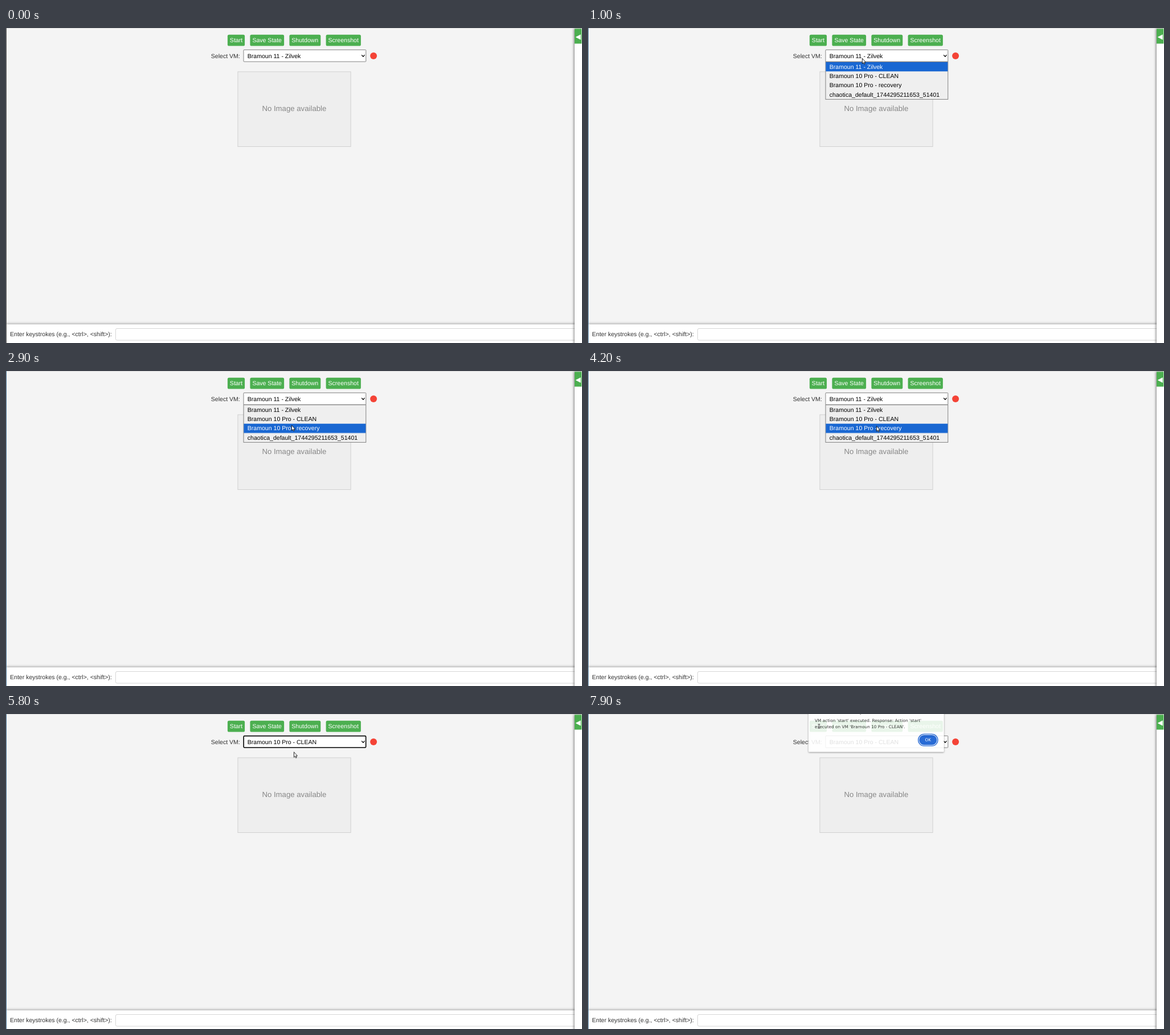
Write an HTML page that moves like this. It is 1011 by 554 pixels and loops after 8 s.

```html
<!DOCTYPE html>
<html lang="en">
<head>
<meta charset="utf-8">
<title>VM control</title>
<style>
html, body { margin: 0; width: 100%; height: 100%; overflow: hidden; background: #f4f4f4; }
svg { display: block; width: 100vw; height: 100vh; }
text {
  font: 10.56px "Liberation Sans", Arial, sans-serif;
  text-rendering: geometricPrecision;
  white-space: pre;
}
.label { fill: #333; }
.button rect { fill: #4caf50; }
.button text { fill: #fff; text-anchor: middle; }
.empty { font-size: 13.2px; fill: #888; text-anchor: middle; }
.bottom { fill: #fff; filter: drop-shadow(0 -1px 2px rgba(0, 0, 0, .35)); }
.side { fill: #fff; filter: drop-shadow(-1px 0 2.2px rgba(0, 0, 0, .5)); }
.dialog { opacity: .88; }
.dialog text { font: 7.35px "DejaVu Sans", sans-serif; fill: #222; }
.dialog .ok { fill: #fff; text-anchor: middle; }
.sheet { fill: #fff; filter: drop-shadow(0 1px 1.5px rgba(0, 0, 0, .45)); }

/* One clock for everything: 1% is 80 ms */
.anim { animation: 8s step-end infinite; }
.edge { animation-name: edge; }
.cursor { animation-name: move; }
.arrow { animation-name: arrow; }
.hand { animation-name: hand; }
.beam, .dialog { animation-name: late; }
.popup { animation-name: popup; }
.bar { animation-name: bar; }
.first { animation-name: first; }
.second { animation-name: second; }
.third { animation-name: third; }
.before { animation-name: before; }
.after { animation-name: after; }
.focus { animation-name: focus; }
.button .hover { animation-name: hover; }

@keyframes edge { 0% { fill: #555; } 5%, 100% { fill: #4b7799; } }
@keyframes move {
  0% { transform: translate(0, 185px); }
  5% { transform: translate(0, 185px); animation-timing-function: steps(5); }
  11.25% { transform: translate(481px, 53px); }
  32.5% { transform: translate(485px, 65px); animation-timing-function: steps(3); }
  36.25% { transform: translate(501px, 95px); }
  37.5% { transform: translate(501px, 95px); animation-timing-function: steps(3); }
  41.25% { transform: translate(504px, 98.5px); }
  50% { transform: translate(504px, 98.5px); animation-timing-function: steps(9); }
  61.25% { transform: translate(513px, 89px); }
  68.75% { transform: translate(514px, 88px); }
  72.5% { transform: translate(505px, 66.5px); }
  75% { transform: translate(459.5px, 31px); }
  77.5% { transform: translate(440px, 26px); animation-timing-function: steps(2); }
  80% { transform: translate(413px, 20px); }
  82.5% { transform: translate(405px, 20px); }
  98.75%, 100% { transform: translate(405.5px, 21.5px); }
}
@keyframes arrow { 0% { opacity: 0; } 5% { opacity: 1; } 80%, 100% { opacity: 0; } }
@keyframes hand { 0% { opacity: 0; } 80% { opacity: 1; } 98.75%, 100% { opacity: 0; } }
@keyframes late { 0% { opacity: 0; } 98.75%, 100% { opacity: .88; } }
@keyframes popup { 0% { opacity: 0; } 12.5% { opacity: 1; } 62.5%, 100% { opacity: 0; } }
@keyframes bar {
  0% { transform: none; }
  35% { transform: translateY(16.35px); }
  36.25% { transform: translateY(32.7px); }
  57.5%, 100% { transform: translateY(16.35px); }
}
@keyframes first { 0% { fill: #fff; } 35%, 100% { fill: #000; } }
@keyframes second { 0% { fill: #000; } 35% { fill: #fff; } 36.25% { fill: #000; } 57.5%, 100% { fill: #fff; } }
@keyframes third { 0% { fill: #000; } 36.25% { fill: #fff; } 57.5%, 100% { fill: #000; } }
@keyframes before { 0% { opacity: 1; } 62.5%, 100% { opacity: 0; } }
@keyframes after { 0% { opacity: 0; } 62.5%, 100% { opacity: 1; } }
@keyframes focus { 0% { opacity: 0; } 62.5% { opacity: 1; } 91.25%, 100% { opacity: 0; } }
@keyframes hover { 0% { fill: #4caf50; } 80%, 100% { fill: #45a049; } }
</style>
</head>
<body>
<svg viewBox="0 0 1011 554" preserveAspectRatio="none">
  <rect width="1011" height="554" fill="#f4f4f4"/>
  <rect width="1011" height="1" fill="#dcdcdc"/>

  <g class="button">
    <rect class="anim hover" x="388.9" y="11.7" width="30.2" height="19.8" rx="2.6"/>
    <text x="404" y="24.9">Start</text>
    <rect x="428.4" y="11.7" width="59.7" height="19.8" rx="2.6"/>
    <text x="458.2" y="24.9">Save State</text>
    <rect x="497.4" y="11.7" width="54.9" height="19.8" rx="2.6"/>
    <text x="524.8" y="24.9">Shutdown</text>
    <rect x="561.6" y="11.7" width="61.3" height="19.8" rx="2.6"/>
    <text x="592.2" y="24.9">Screenshot</text>
  </g>

  <text class="label" x="359.8" y="52.6">Select VM:</text>
  <rect x="417" y="38.4" width="214.8" height="20.8" rx="1" fill="#fff" stroke="#767676" stroke-width=".9"/>
  <rect class="anim focus" x="417.2" y="38.6" width="214.4" height="20.4" rx="1.6" fill="none" stroke="#101010" stroke-width="1.6"/>
  <text class="anim before" x="423.8" y="52.6">Bramoun 11 - Zilvek</text>
  <text class="anim after" x="423.8" y="52.6">Bramoun 10 Pro - CLEAN</text>
  <path d="M624.2 47.4l2.7 2.8 2.7-2.8" fill="none" stroke="#000" stroke-width="1.3"/>
  <circle cx="645.1" cy="49" r="6" fill="#f44336"/>

  <rect x="406.9" y="76.9" width="198.2" height="131.7" fill="#eee" stroke="#ccc" stroke-width=".9"/>
  <text class="empty" x="505.9" y="146.4">No Image available</text>

  <g class="anim popup">
    <rect x="417" y="59.6" width="214.8" height="65.8" fill="#efefef" stroke="#767676" stroke-width=".9"/>
    <rect class="anim bar" x="417.4" y="60" width="214" height="16.3" fill="#1967d2"/>
    <text class="anim first" x="423.8" y="71.8">Bramoun 11 - Zilvek</text>
    <text class="anim second" x="423.8" y="88.1">Bramoun 10 Pro - CLEAN</text>
    <text class="anim third" x="423.8" y="104.4">Bramoun 10 Pro - recovery</text>
    <text x="423.8" y="120.7">chaotica_default_1744295211653_51401</text>
  </g>

  <rect class="bottom" y="521.2" width="1011" height="40"/>
  <text class="label" x="7" y="542.2">Enter keystrokes (e.g., &lt;ctrl&gt;, &lt;shift&gt;):</text>
  <rect x="192.4" y="528.5" width="812" height="20.6" rx="2.6" fill="#fff" stroke="#ccc" stroke-width=".8"/>

  <rect class="side" x="998" y="1" width="20" height="560"/>
  <rect x="998" y="1.3" width="12.4" height="26.2" fill="#4caf50"/>
  <path d="M999.6 16l9.2-4.7v9.4z" fill="#fff"/>
  <rect class="anim edge" width="1" height="554"/>

  <g class="anim dialog">
    <rect class="sheet" x="387" y="-10" width="237.8" height="76.8" rx="1.5"/>
    <text x="467" y="-1.3" style="font-size:8.6px">says</text>
    <text x="398" y="14">VM action 'start' executed. Response: Action 'start'</text>
    <text x="398" y="24.5">executed on VM 'Bramoun 10 Pro - CLEAN'.</text>
    <rect x="579.6" y="35.4" width="34.4" height="20.8" rx="10.4" fill="#fff" stroke="#0b57d0" stroke-width="1.3"/>
    <rect x="581.2" y="37" width="31.2" height="17.6" rx="8.8" fill="#0b57d0"/>
    <text class="ok" x="596.7" y="48.4">OK</text>
  </g>

  <g class="anim cursor">
    <path class="anim arrow" d="M.4.4v9.2l2-1.8 1.4 2.9 1.4-.7-1.4-2.8h2.7z" fill="#fff" stroke="#111" stroke-width=".9" stroke-linejoin="round"/>
    <path class="anim hand" d="M-.8 5V.9q.8-.9 1.6 0v2.6l2.8.7q.8.3.6 1.4l-.7 3.2h-4.4L-3.4 5.9q.2-1.2 1.3-.7z" fill="#fff" stroke="#111" stroke-width=".8" stroke-linejoin="round"/>
    <g class="anim beam" fill="none">
      <path d="M-1.8-3.4h3.6M0-3.4v6.8M-1.8 3.4h3.6" stroke="#fff" stroke-width="2"/>
      <path d="M-1.8-3.4h3.6M0-3.4v6.8M-1.8 3.4h3.6" stroke="#111" stroke-width="1"/>
    </g>
  </g>
</svg>
</body>
</html>
```
